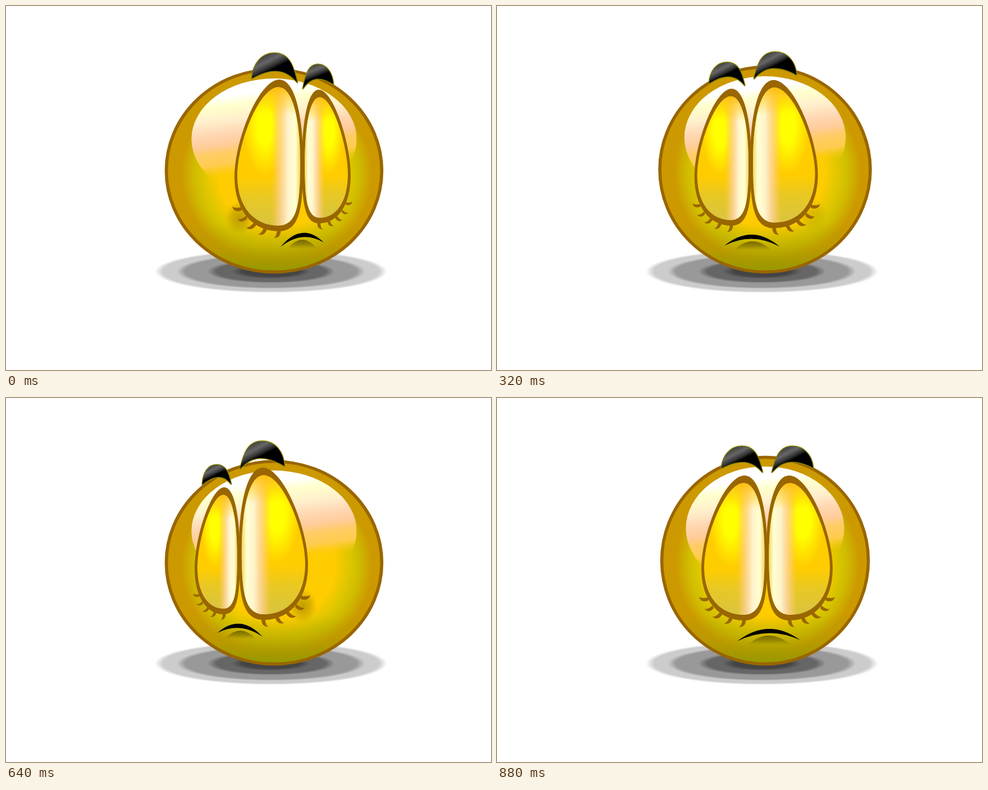
An HTML page with a canvas that plays this animation: 864x648 px, repeating every 0.96 s.

```html
<!DOCTYPE html>
<html lang="en">
<head>
<meta charset="utf-8">
<title>Sad face shaking its head</title>
<style>
  html, body { margin: 0; width: 100%; height: 100%; overflow: hidden; background: #fff; }
  canvas { display: block; }
</style>
</head>
<body>
<canvas id="stage" width="864" height="648"></canvas>
<script>
const ctx = document.getElementById('stage').getContext('2d');
const STEP = 80;
const BROWN = '#996600';

// Head turn per step: 1 is fully right, -1 fully left
const turns = [1, .9, .62, 0, -.44, -.74, -.97, -1.01, -1, -.88, -.66, 0];

// eyes: middle, left [outer, top, bottom], right [same]
// brows: [outer x, y, inner x, y, top]; mouth: [x0, y0, x1, y1, peak]
const poses = {
  right: {
    mid: [528], leftEye: [407, 131, 401], rightEye: [614, 149, 387],
    leftBrow: [438, 129, 519, 136, 84], rightBrow: [583, 139, 529, 147, 104],
    mouth: [489, 429, 566, 421, 404]
  },
  centre: {
    mid: [480.5], leftEye: [364, 138, 396], rightEye: [598, 138, 396],
    leftBrow: [400, 125, 473, 132, 86], rightBrow: [563, 124, 490, 132, 86],
    mouth: [428, 433, 540, 431, 411]
  },
  left: {
    mid: [416], leftEye: [336, 159, 385], rightEye: [538, 124, 395],
    leftBrow: [350, 154, 401, 153, 119], rightBrow: [496, 121, 417, 126, 77],
    mouth: [377, 418, 457, 425, 402]
  }
};

// Unit egg: x runs from the inner to the outer side
const egg = new Path2D('M.34 0C.12 0 -.01 .22 -.01 .55C-.01 .85 .04 1 .35 1C.72 1 1 .87 1 .64C1 .4 .64 0 .34 0Z');

// [root x, root y, tip x, tip y] in units of the eye box
const lashes = [
  [.89, .85, 1.035, .835], [.82, .905, .955, .92], [.69, .945, .83, .975],
  [.54, .97, .65, 1.02], [.35, .98, .42, 1.045]
];

function withStops(gradient, stops) {
  stops.forEach(([at, colour]) => gradient.addColorStop(at, colour));
  return gradient;
}
const linear = (x0, y0, x1, y1, ...stops) => withStops(ctx.createLinearGradient(x0, y0, x1, y1), stops);
const radial = (x, y, r, ...stops) => withStops(ctx.createRadialGradient(x, y, 0, x, y, r), stops);

const shadowFill = radial(0, 0, 1, [0, '#444'], [.24, '#444'], [.34, '#666'], [.47, '#666'],
  [.55, '#999'], [.74, '#999'], [.81, '#ccc'], [.93, '#ccc'], [1, '#ccc0']);
const ballFill = radial(482, 295, 190, [0, '#fc0'], [.52, '#fc0'], [.66, '#dcc600'],
  [.74, '#d0bc00'], [.86, '#c90'], [1, '#c90']);
const ballBase = linear(0, 385, 0, 468, [0, '#9900'], [.5, '#a8980060'], [1, '#990']);
const gloss = linear(462, 122, 488, 302, [0, '#fff'], [.12, '#fff'], [.22, '#ffc'],
  [.36, '#ffefcc'], [.48, '#ffd8b4'], [.6, '#ffcc99'], [.68, '#ffcc66'], [.8, '#ffcc4d'], [.93, '#ffcc0000']);
const eyeFills = [
  linear(0, 0, 0, 1, [0, '#fc0'], [.65, '#fc0'], [.8, '#e8c824'], [1, '#d8c440']),
  radial(.55, .28, .36, [0, '#ff0'], [.35, '#ff0'], [1, '#ffff0000']),
  linear(0, 0, .46, 0, [0, '#f2dc70'], [.14, '#ffffd0'], [.4, '#fff4cc'],
    [.62, '#ffd8acd0'], [.82, '#ffcc8078'], [1, '#ffcc3300']),
  linear(0, 0, 0, .2, [0, '#ffbe10'], [.35, '#ffc81ca0'], [1, '#ffcc0000'])
];
const cheek = radial(0, 0, 1, [0, '#94780090'], [.5, '#94800060'], [1, '#99800000']);

function fillEllipse(x, y, rx, ry, fill) {
  ctx.save();
  ctx.translate(x, y);
  ctx.scale(rx, ry);
  ctx.beginPath();
  ctx.arc(0, 0, 1, 0, 7);
  ctx.fillStyle = fill;
  ctx.fill();
  ctx.restore();
}

function ball(squash) {
  ctx.save();
  ctx.translate(477.5, 476.5);
  ctx.scale(1 + .043 * squash, 1 - .02 * squash);
  ctx.translate(-477.5, -476.5);
  ctx.beginPath();
  ctx.arc(477.5, 289.5, 184, 0, 7);
  for (ctx.fillStyle of [ballFill, ballBase]) ctx.fill();
  ctx.strokeStyle = BROWN;
  ctx.lineWidth = 5.5;
  ctx.stroke();
  ctx.beginPath();
  ctx.ellipse(477.5, 232, 141, 110, 0, 0, 7);
  ctx.fillStyle = gloss;
  ctx.fill();
  ctx.restore();
}

function eye(inner, [outer, top, bottom], nearness) {
  const w = Math.abs(outer - inner), h = bottom - top;
  ctx.save();
  ctx.translate(inner, top);
  ctx.scale(Math.sign(outer - inner), 1);

  ctx.globalAlpha = Math.min(1, Math.max(0, nearness));
  fillEllipse(w * .92, h * .91, 26, 30, cheek);
  ctx.globalAlpha = 1;

  ctx.fillStyle = BROWN;
  for (const [u0, v0, u1, v1] of lashes) {
    const x0 = u0 * w, y0 = v0 * h, x1 = u1 * w, y1 = v1 * h;
    const dx = x1 - x0, dy = y1 - y0;
    const bend = k => [(x0 + x1) / 2 - dy * k + dx * .2, (y0 + y1) / 2 + dx * k + dy * .2];
    ctx.beginPath();
    ctx.moveTo(x0 + dy * .15, y0 - dx * .15);
    ctx.quadraticCurveTo(...bend(.2), x1, y1);
    ctx.quadraticCurveTo(...bend(.62), x0 - dy * .2, y0 + dx * .2);
    ctx.fill();
  }

  ctx.save();
  ctx.scale(w, h);
  ctx.fill(egg);
  ctx.restore();
  ctx.translate(5, 13.5);
  ctx.scale(w - 10, h - 23.5);
  for (ctx.fillStyle of eyeFills) ctx.fill(egg);
  ctx.restore();
}

function brow([ox, oy, ix, iy, top]) {
  const w = ix - ox, h = iy - top;
  const at = (u, v) => [ox + u * w, top + v * h];
  ctx.beginPath();
  ctx.moveTo(ox, oy);
  ctx.bezierCurveTo(...at(.02, .4), ...at(.2, 0), ...at(.5, 0));
  ctx.bezierCurveTo(...at(.84, 0), ...at(.92, .5), ix, iy);
  ctx.bezierCurveTo(...at(.78, .6), ...at(.5, .42), ox, oy);
  ctx.closePath();
  ctx.lineJoin = 'round';
  ctx.lineWidth = 3;
  ctx.strokeStyle = '#8c8400';
  ctx.stroke();
  const x = Math.min(ox, ix), size = Math.abs(w);
  ctx.fillStyle = linear(x + size * .4, top, x + size * .58, top + h * .56,
    [0, '#444'], [.35, '#666'], [.65, '#333'], [.85, '#000']);
  ctx.fill();
}

function mouth([x0, y0, x1, y1, peak]) {
  const cx = (x0 + x1) / 2, ends = (y0 + y1) / 2, w = x1 - x0;
  const crest = peak + 12, base = ends + 8;
  ctx.beginPath();
  ctx.moveTo(x0 + w * .16, base);
  ctx.quadraticCurveTo(cx, crest * 2 - base, x1 - w * .14, base);
  ctx.fillStyle = linear(0, crest, 0, base, [0, '#776600'], [.5, '#887700c0'], [1, '#99880000']);
  ctx.fill();

  const control = peak * 2 - ends;
  ctx.beginPath();
  ctx.moveTo(x0, y0);
  ctx.quadraticCurveTo(cx, control, x1, y1);
  ctx.quadraticCurveTo(cx, control + 15, x0, y0);
  ctx.fillStyle = '#000';
  ctx.fill();
}

function draw(turn) {
  const amount = Math.abs(turn);
  const side = turn > 0 ? poses.right : poses.left;
  const part = name => poses.centre[name].map((v, i) => v + (side[name][i] - v) * amount);
  const [mid] = part('mid');

  ctx.clearRect(0, 0, 864, 648);
  fillEllipse(472, 472.5, 207, 38, shadowFill);
  ball(amount);
  eye(mid, part('leftEye'), turn);
  eye(mid, part('rightEye'), -turn);
  brow(part('leftBrow'));
  brow(part('rightBrow'));
  mouth(part('mouth'));
}

function tick() {
  draw(turns[Math.floor(performance.now() / STEP) % turns.length]);
  requestAnimationFrame(tick);
}
tick();
</script>
</body>
</html>
```
